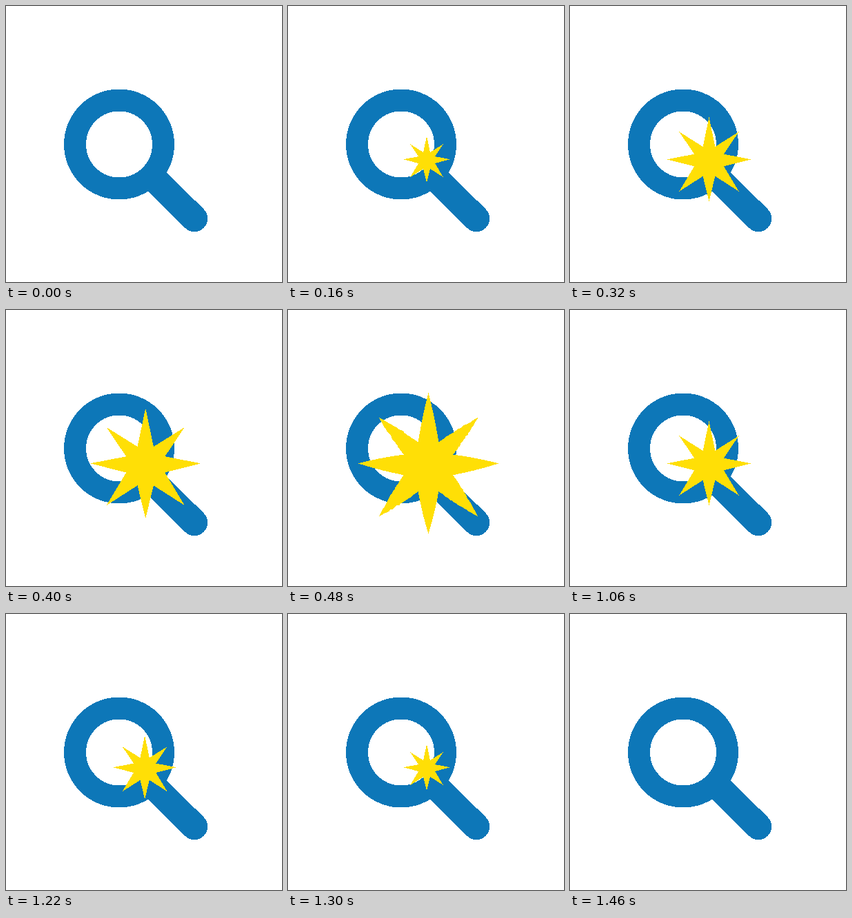
Animation of 400 by 400 pixels, one loop 1540 ms. Source, as an HTML page:

```html
<!DOCTYPE html>
<html lang="en">
<head>
<meta charset="utf-8">
<title>Search spark</title>
<style>
  html, body { margin: 0; width: 100%; height: 100%; overflow: hidden; background: #fff; }
  svg { display: block; width: 100vw; height: 100vh; }
</style>
</head>
<body>
<svg viewBox="0 0 400 400" shape-rendering="crispEdges">
  <g fill="none" stroke="#0d77b8">
    <circle cx="164" cy="200.5" r="64" stroke-width="32"/>
    <path d="M214 249.7 L273 308" stroke-width="38.4" stroke-linecap="round"/>
  </g>
  <path id="star" fill="#ffdf06"/>
</svg>
<script>
const LOOP = 1540, STEP = 80, TOP = 6;
const RAYS = 8, NOTCH = 0.38;
const star = document.getElementById('star');

// Repeatable noise from -1 to 1
function noise(n) {
  const v = Math.sin(n * 127.1) * 43758.5453;
  return (v - Math.floor(v)) * 2 - 1;
}

// Burst size in whole steps: grow, hold, shrink with a short pause at 4
function level(t) {
  const grow = Math.floor(t / STEP);
  const shrink = TOP - Math.floor((t - 900) / STEP);
  const fade = Math.ceil((LOOP - t) / STEP) - 1;
  return Math.min(TOP, grow, Math.max(shrink, Math.min(4, fade)));
}

// Tips and notches alternate; the slanted rays sag a little
function corners(n) {
  const r = 17 * n - 7 * Math.max(0, Math.sin(Math.PI * (n - 2) / 4));
  const cx = 201 + 2.5 * (n / TOP) ** 4, cy = 222.3;
  return Array.from({ length: RAYS * 2 }, (_, i) => {
    const a = i * Math.PI / RAYS, d = i % 2 ? NOTCH : 1;
    const sag = 0.075 * Math.abs(Math.sin(2 * a) * Math.cos(a));
    return [cx + r * d * Math.sin(a), cy + r * (sag - d * Math.cos(a))];
  });
}

// Slightly swollen edges, ragged on the diagonal rays
function roughen(pts, parts = 20) {
  return pts.flatMap(([x, y], i) => {
    const [u, v] = pts[(i + 1) % pts.length];
    const len = Math.hypot(u - x, v - y);
    const ragged = i % 4 === 1 || i % 4 === 2;
    return Array.from({ length: parts }, (_, k) => {
      const p = k / parts, swell = Math.sin(Math.PI * p);
      const d = swell * (1 + (ragged ? noise(i * parts + k) : 0));
      return [x + (u - x) * p + (v - y) / len * d,
              y + (v - y) * p - (u - x) / len * d];
    });
  });
}

function outline(n) {
  if (n <= 0) return '';
  const pts = corners(n);
  return 'M' + (n === TOP ? roughen(pts) : pts)
    .map(p => p.map(c => c.toFixed(2)).join(' ')).join('L') + 'Z';
}

function draw(now) {
  star.setAttribute('d', outline(level(now % LOOP)));
}

let start;
function tick(now) {
  if (start === undefined) start = now;
  draw(Math.max(0, now - start));
  requestAnimationFrame(tick);
}
draw(0);
requestAnimationFrame(tick);
</script>
</body>
</html>
```
